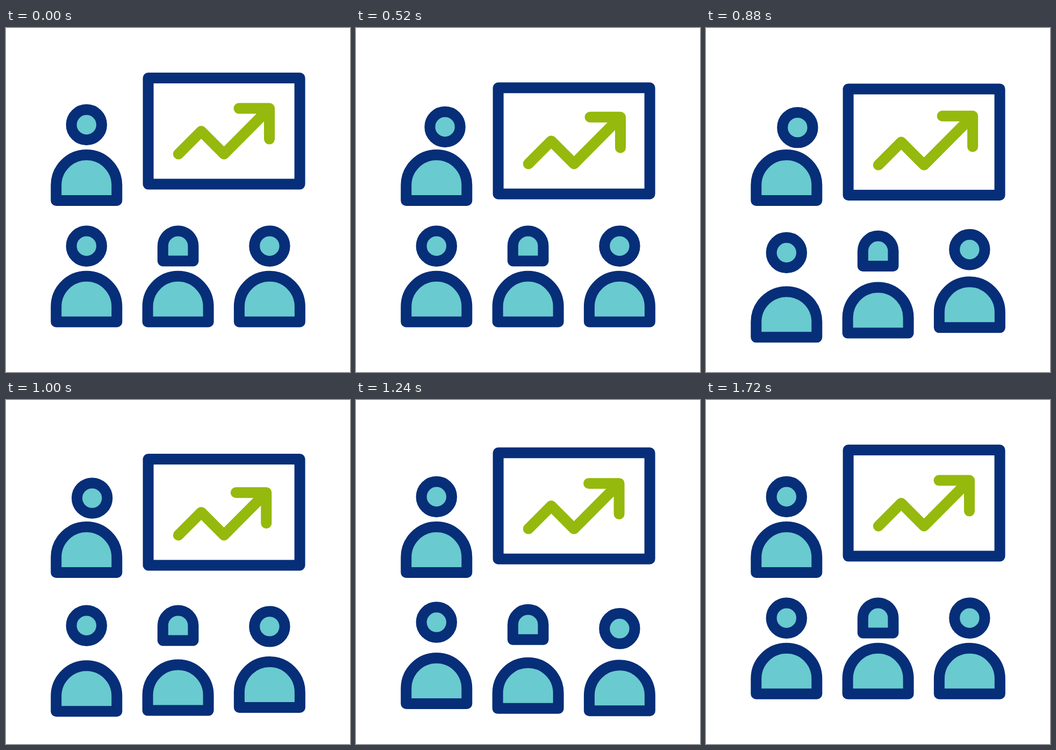
Animation, 640 px wide and 640 px high, one loop 1760 ms. Source, as an HTML page:

```html
<!DOCTYPE html>
<html lang="en">
<head>
<meta charset="utf-8">
<title>Presentation</title>
<style>
  html, body { margin: 0; height: 100%; overflow: hidden; background: #fff; }
  svg { display: block; width: 100%; height: 100%; }
  .ink { fill: #69cacf; stroke: #072e78; stroke-width: 20; stroke-linejoin: round; }
  .chart { fill: none; stroke: #95b90d; stroke-width: 20; stroke-linecap: round; stroke-linejoin: round; }
</style>
</head>
<body>
<svg viewBox="0 0 640 640">
  <defs>
    <path id="body" d="M93.3 321V292.5a56.5 56.5 0 0 1 113 0V321z"/>
    <circle id="head" cx="149.8" cy="180" r="28.2"/>
    <path id="bob" d="M121.5 207.8V180a28.3 28.3 0 0 1 56.6 0V207.8z"/>
  </defs>
  <g id="board">
    <rect class="ink" x="264.6" y="93.1" width="282" height="197.5" style="fill:#fff"/>
    <path id="line" class="chart"/>
  </g>
  <g class="ink">
    <use href="#body"/>
    <use id="speaker" href="#head"/>
    <g id="audience"></g>
  </g>
</svg>
<script>
const LOOP = 1760, STEP = 40;
const $ = id => document.getElementById(id);

// Ease in and out: cubic-bezier(.5, 0, .5, 1)
function ease(x) {
  let lo = 0, hi = 1;
  for (let i = 0; i < 24; i++) {
    const s = (lo + hi) / 2;
    if (1.5 * s * (1 - s) + s ** 3 < x) lo = s; else hi = s;
  }
  return lo * lo * (3 - 2 * lo);
}

// Keys are [time, value] pairs
function track(t, keys) {
  if (t <= keys[0][0]) return keys[0][1];
  for (let i = 1; i < keys.length; i++) {
    const [t0, v0] = keys[i - 1], [t1, v1] = keys[i];
    if (t < t1) return v0 + (v1 - v0) * ease((t - t0) / (t1 - t0));
  }
  return keys[keys.length - 1][1];
}

const bump = (t, start, peak, end, size) => track(t, [[start, 0], [peak, size], [end, 0]]);
const move = (el, x, y) => el.setAttribute("transform", `translate(${x} ${y})`);

const people = [["head", 14], ["bob", 14.8], ["head", 20.2]].map(([shape, nod], i) => {
  const [body, head] = ["body", shape].map(id => {
    const use = document.createElementNS("http://www.w3.org/2000/svg", "use");
    use.setAttribute("href", "#" + id);
    return $("audience").appendChild(use);
  });
  return { body, head, nod, x: i * 170.3, delay: i * 80 };
});

function draw(t) {
  move($("board"), 0, bump(t, 40, 725, 1525, 21.6));

  const grow = track(t, [[40, 0], [340, -17.7], [710, 23.9], [1020, -5.9], [1300, 0]]);
  const x = 490 + grow, y = 149.6 - grow;
  $("line").setAttribute("d",
    `M320.8 234.5L363.2 192L405.6 234.5L${x} ${y}M${x - 56.5} ${y}H${x}V${y + 57}`);

  const lean = bump(t, 245, 725, 1235, 24.6);
  move($("speaker"), lean, lean / 4);

  for (const p of people) {
    const sink = bump(t - p.delay, 520, 1010, 1500, 1);
    move(p.body, p.x, 225.8 + 32.5 * sink);
    move(p.head, p.x, 225.7 + p.nod * sink);
  }
}

function tick() {
  const t = performance.now() % LOOP;
  draw(Math.floor(t / STEP + 0.1) * STEP);
  requestAnimationFrame(tick);
}
tick();
</script>
</body>
</html>
```
